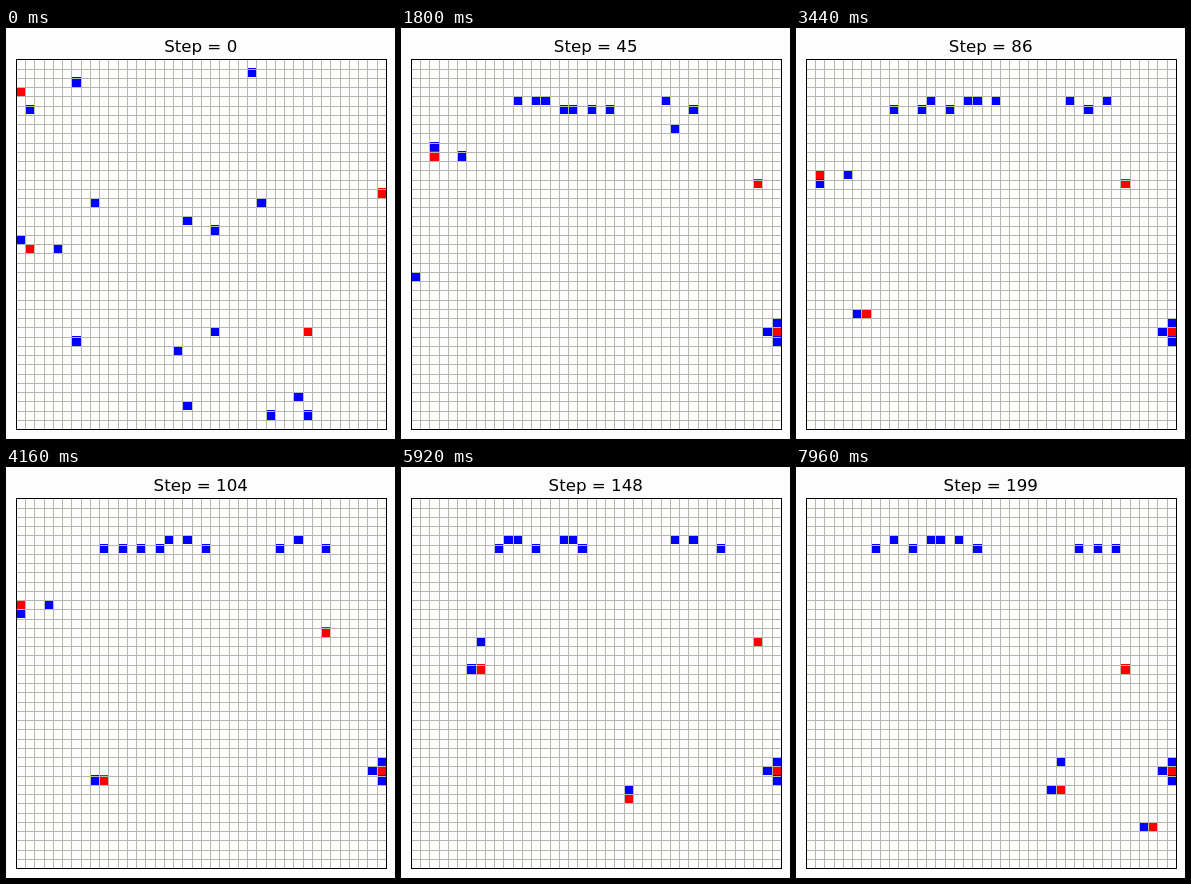
Recreate the animation shown at these times as an HTML page. Size 389 by 411 pixels, loop 8 s.

```html
<!DOCTYPE html>
<html lang="en">
<head>
<meta charset="utf-8">
<title>Pursuit on a grid</title>
<style>
  html, body { margin: 0; width: 100%; height: 100%; overflow: hidden; background: #fdfdfe; }
  svg { display: block; width: 100vw; height: 100vh; }
  text { font: 16.67px "DejaVu Sans", sans-serif; text-anchor: middle; }
</style>
</head>
<body>
<svg viewBox="0 0 389 411" shape-rendering="crispEdges">
  <g id="agents"></g>
  <path id="grid" fill="none" stroke="#b6b6ae"/>
  <rect x="10.5" y="31.5" width="370" height="370" fill="none" stroke="#000"/>
  <text id="title" x="194.7" y="24"></text>
</svg>
<script>
const SIZE = 40, PITCH = 9.25, LEFT = 10, TOP = 31;
const STEP_MS = 40, STEPS = 200;
const BLUE = "#00f", RED = "#f00";
const byId = id => document.getElementById(id);

let seed = 7;
function random() {
  seed = (Math.imul(seed, 1664525) + 1013904223) >>> 0;
  return seed / 2 ** 32;
}

// --- Behaviour: every agent moves at most one cell per step ---
const MOVES = [[0, 0], [1, 0], [-1, 0], [0, 1], [0, -1]];
const inside = v => v >= 0 && v < SIZE;
const agents = [];

function addAgent(start, color, decide) {
  const shape = document.createElementNS("http://www.w3.org/2000/svg", "path");
  shape.setAttribute("fill", color);
  byId("agents").append(shape);
  const agent = { shape, decide, cells: [start], heading: [0, 0] };
  agents.push(agent);
  return agent;
}

function moveToward([c, r], goal, noise = 0, allowed = () => true) {
  let best = [c, r], bestScore = Infinity;
  for (const [dc, dr] of MOVES) {
    const x = c + dc, y = r + dr;
    if (!inside(x) || !inside(y) || !allowed(x, y)) continue;
    const score = Math.hypot(goal[0] - x, goal[1] - y) + random() * noise;
    if (score < bestScore) [best, bestScore] = [[x, y], score];
  }
  return best;
}

// Prey stagger along a line between waypoints, reaching each one on time.
const waypointSteps = [0, 23, 68, 104, 128, 169, 199];
function addPrey(...path) {
  return addAgent(path[0], RED, (cell, step, self) => {
    const i = waypointSteps.findIndex(s => s >= step);
    if (i >= path.length) return cell;
    const [x0, y0] = path[i - 1], [x1, y1] = path[i];
    const start = waypointSteps[i - 1], end = waypointSteps[i];
    const u = (step - start) / (end - start);
    self.heading = [x1 - x0, y1 - y0];
    const inTime = (x, y) => Math.abs(x1 - x) + Math.abs(y1 - y) <= end - step;
    return moveToward(cell, [x0 + (x1 - x0) * u, y0 + (y1 - y0) * u], 1.5, inTime);
  });
}

// A chaser stays behind its prey on the main axis of flight, or, flanking, on the other axis.
function addChaser(start, prey, gap, flanking = false) {
  addAgent(start, BLUE, (cell, step) => {
    const [x, y] = prey.cells[step], [dx, dy] = prey.heading;
    const alongX = (Math.abs(dx) >= Math.abs(dy)) !== flanking;
    return moveToward(cell, alongX ? [x - Math.sign(dx) * gap, y] : [x, y - Math.sign(dy) * gap]);
  });
}

// A trapper closes in on one side of its prey.
function addTrapper(start, prey, dx, dy) {
  addAgent(start, BLUE, (cell, step) => {
    const [x, y] = prey.cells[step];
    return moveToward(cell, [x + dx, y + dy]);
  });
}

// Roamers gather in a loose, slowly drifting row.
function addRoamers(starts, first, spacing, drift) {
  starts.forEach((start, i) => addAgent(start, BLUE, (cell, step) =>
    moveToward(cell, [first + spacing * i + drift * step, 4.5], 1.4)));
}

const runner = addPrey([0, 3], [2, 8], [1, 14], [0, 11], [1, 12], [14, 24], [27, 31]);
const diver = addPrey([1, 20], [0, 22], [3, 24], [9, 30], [18, 27], [28, 38], [37, 35]);
const captive = addPrey([31, 29], [39, 29]);
addPrey([39, 14], [38, 14], [35, 14], [33, 14], [39, 12], [36, 18], [34, 18]);

addChaser([1, 5], runner, 3, true);
addChaser([4, 20], runner, 1);
addChaser([0, 19], diver, 1);
addTrapper([27, 38], captive, -1, 0);
addTrapper([30, 36], captive, 0, -1);
addTrapper([31, 38], captive, 0, 1);
addRoamers([[6, 2], [6, 30], [8, 15], [17, 31], [18, 17], [21, 18], [21, 29]], 11.2, 1.8, -.02);
addRoamers([[26, 15], [25, 1], [18, 37]], 27.2, 2, .01);

for (let step = 1; step < STEPS; step++)
  for (const agent of agents)
    agent.cells.push(agent.decide(agent.cells[step - 1], step, agent));

// --- Drawing ---
const roundHalfDown = v => Math.ceil(v - .5);
const edgeX = c => roundHalfDown(LEFT + c * PITCH);
const edgeY = r => roundHalfDown(TOP + r * PITCH);
// Row lines sit a fraction lower than the cell edges, so some cells show a sliver above the line.
const lineY = r => Math.round(TOP + .36 + r * (PITCH - .007));

let lines = "";
for (let i = 1; i < SIZE; i++)
  lines += `M11 ${lineY(i) + .5}H380M${edgeX(i) + .5} 32V401`;
byId("grid").setAttribute("d", lines);

const cellPath = ([c, r]) =>
  `M${edgeX(c)} ${edgeY(r)}H${edgeX(c + 1)}V${edgeY(r + 1)}H${edgeX(c)}z`;

let shown = -1;
function draw() {
  const step = Math.floor(performance.now() / STEP_MS) % STEPS;
  if (step !== shown) {
    shown = step;
    byId("title").textContent = `Step = ${step}`;
    for (const { shape, cells } of agents) shape.setAttribute("d", cellPath(cells[step]));
  }
  requestAnimationFrame(draw);
}
draw();
</script>
</body>
</html>
```
